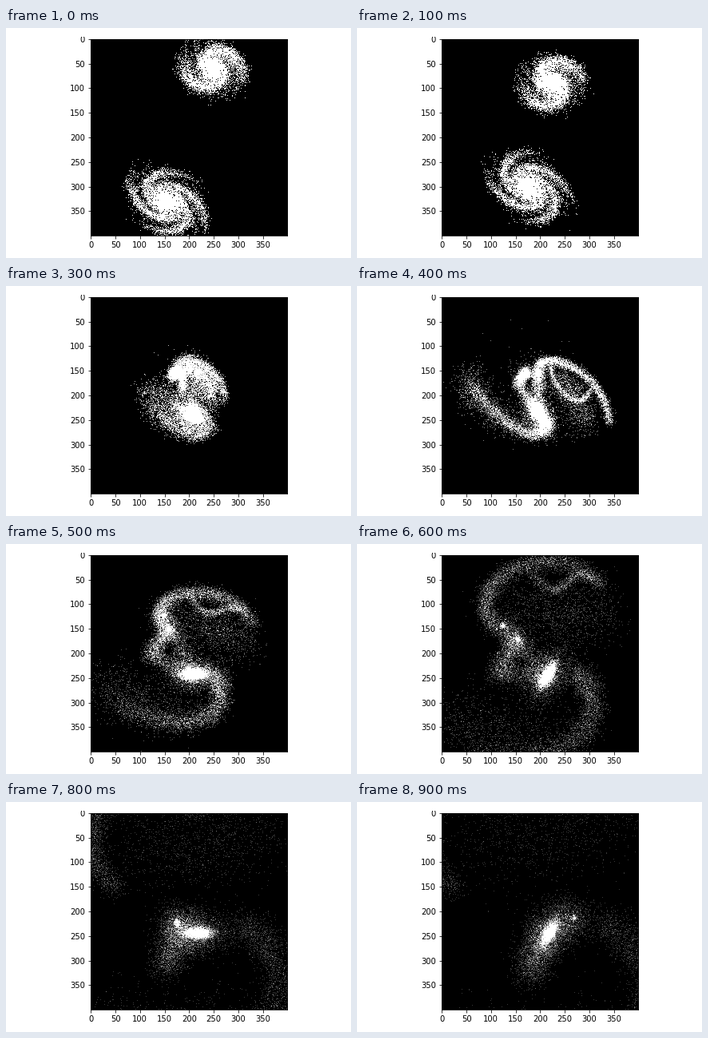
Write a matplotlib script that moves like this. It is 432x288 px and loops after 1000 ms.

```python
import numpy as np
import matplotlib.pyplot as plt
from matplotlib.animation import FuncAnimation
from matplotlib.patches import Rectangle

W, H, DPI = 432, 288, 72
FRAMES, STEP_MS = 10, 100
SIZE, CELLS = 400, 246
LEFT, TOP, SIDE = 105.93, 13.57, 246.24
CONTACT = 4                                    # frame of the close encounter
rng = np.random.default_rng(8)

T = np.arange(CONTACT, FRAMES)
SPREAD = ((T - CONTACT) / 2) ** .75            # debris slows as it escapes
GROW = SPREAD[:, None, None]


def through(knots, points, at):
    """Polynomial curve through a few key points."""
    coef = np.polyfit(knots, points, len(points) - 1)
    return np.vander(at, len(points)) @ coef


def orbit(*points):
    return through((5, 6, 7, 9), points, T)


def scatter(count):
    return rng.normal(size=(count, 2))


def debris(count, width, early, late):
    """A curved tail that drifts from one shape to the next and beyond."""
    s, knots = rng.random(count), np.linspace(0, 1, len(early))
    a, b = through(knots, early, s), through(knots, late, s)
    return a + GROW * (b - a) + width * (1 + GROW) * scatter(count)


def bridge(count, width, a, b, skew):
    s = rng.random((count, 1)) ** skew
    line = a[:, None] + s * (b - a)[:, None]
    return line + width * (1 + GROW) * scatter(count)


def nucleus(count, path):
    width = 1.6 + 9 * np.exp(-2 * (T - CONTACT))
    cloud = scatter(count) * rng.exponential(1, (count, 1))
    return path[:, None] + width[:, None, None] * cloud


def bulge(count, path, long, short, growth=0):
    """Elongated core that turns by a fixed angle each frame."""
    turn = np.radians(-60 * (T - 5))[:, None]
    u, v = (scatter(count) * (long, short)).T
    cloud = np.stack([u * np.cos(turn) - v * np.sin(turn),
                      u * np.sin(turn) + v * np.cos(turn)], axis=-1)
    return path[:, None] + (1 + growth * GROW) * cloud


def galaxy(parts, radius, arms, start, end, phase, flat, tilt):
    """Spiral disc whose particles, from the core outwards, become the parts."""
    late = np.concatenate(parts, axis=1)
    n = late.shape[1]
    r = radius * np.linspace(.001, 1, n) ** 1.3 * np.exp(.12 * rng.normal(size=n))
    angle = rng.integers(arms, size=n) * 2 * np.pi / arms + 2.5 * np.log(r / 32)
    angle += (.6 / arms + (20 / r) ** 2) * rng.normal(size=n)
    angle = np.where(rng.random(n) < .25, rng.uniform(0, 2 * np.pi, n), angle)
    c, s = np.cos(tilt), np.sin(tilt)
    start, end = np.array(start), np.array(end)
    early = []
    for k in range(CONTACT):
        a = angle + phase - k / 2
        disc = np.column_stack([r * np.cos(a), flat * r * np.sin(a)])
        early.append(disc @ [[c, s], [-s, c]] + start + (end - start) * k / 2)
    early[-1] = (early[-1] + late[0]) / 2
    return np.concatenate([early, late])


core = np.array([217, 244]) - np.exp(CONTACT - T)[:, None] * (20, 7)
first = orbit((150, 123), (125, 145), (130, 188), (268, 213))
second = orbit((160, 153), (155, 172), (160, 200), (211, 241))
spur = orbit((118, 204), (110, 242), (122, 282), (175, 330))

upper = galaxy([
    nucleus(350, first),
    nucleus(450, second),
    bridge(1300, 7, first, core, 1.7),
    bridge(1300, 6, second, spur, 1.5),
    debris(3000, 5, [(195, 145), (235, 132), (300, 170), (340, 255)],
           [(112, 150), (100, 70), (190, 14), (325, 60)]),
    debris(800, 3, [(220, 140), (240, 190), (275, 210), (300, 190)],
           [(180, 35), (235, 70), (270, 45), (320, 60)]),
    debris(1300, 18, [(225, 165), (265, 195), (290, 260)],
           [(140, 90), (240, 120), (330, 110)]),
], 64, 2, (247, 62), (200, 121), .7, .95, .6)

lower = galaxy([
    bulge(3000, core, 14, 6),
    bulge(1800, core, 22, 14, .3),
    bridge(800, 6, spur, core, 1),
    debris(2800, 7, [(215, 250), (200, 275), (150, 265), (60, 180)],
           [(265, 235), (305, 300), (255, 385), (60, 400)]),
    debris(1000, 18, [(60, 160), (80, 220), (170, 260)],
           [(20, 330), (110, 360), (250, 350)]),
], 85, 4, (155, 331), (200, 272), 2.0, .72, .6)

stars = np.concatenate([upper, lower], axis=1)


def density(k):
    x, y = stars[k].T
    counts = np.histogram2d(y, x, bins=CELLS, range=[[-.5, SIZE - .5]] * 2)[0]
    gain = .2 + .8 / (1 + (k / 3.5) ** 4)
    return np.clip(counts * gain, 0, 1)


plt.rcParams.update({"font.family": "DejaVu Sans", "font.size": 10})
fig = plt.figure(figsize=(W / DPI, H / DPI), dpi=DPI, facecolor="white")
ax = fig.add_axes([LEFT / W, 1 - (TOP + SIDE) / H, SIDE / W, SIDE / H])
image = ax.imshow(density(0), cmap="gray", vmin=0, vmax=1, interpolation="nearest",
                  extent=(-.5, SIZE - .5, SIZE - .5, -.5))
ax.set_xticks(range(0, SIZE, 50))
ax.set_yticks(range(0, SIZE, 50))
# The top margin crops the uppermost label.
fig.add_artist(Rectangle((0, 1 - 11 / H), 1, 11 / H, color="white", lw=0, zorder=10))


def update(k):
    image.set_data(density(k))
    return (image,)


anim = FuncAnimation(fig, update, frames=FRAMES, interval=STEP_MS,
                     repeat=True, repeat_delay=0, blit=False)
plt.show()
```
